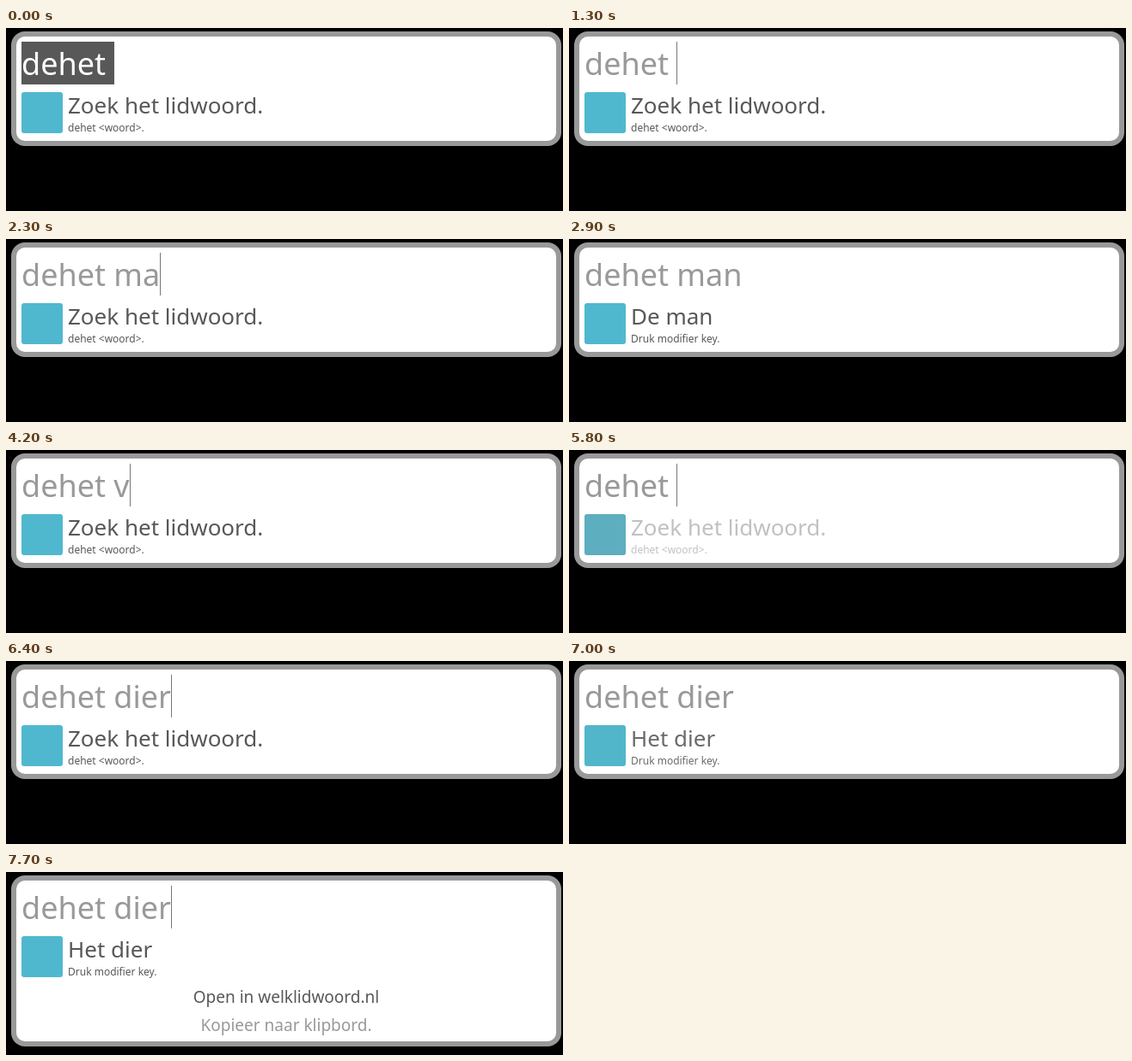
Write an HTML page with a canvas that moves like this. It is 648 by 214 pixels and loops after 8000 ms.

```html
<!DOCTYPE html>
<html lang="nl">
<head>
<meta charset="utf-8">
<title>Lidwoord zoeken</title>
<style>
  html, body { margin: 0; width: 100%; height: 100%; overflow: hidden; background: #000; }
  canvas { display: block; width: 648px; height: 214px; }
</style>
</head>
<body>
<canvas id="stage" width="648" height="214"></canvas>
<script>
const ctx = document.getElementById('stage').getContext('2d');
const LOOP = 8000, TICK = 100;
const GREY = '#999', DARK = '#585858', TEAL = '#50b8ce';

const HINT = ['Zoek het lidwoord.', 'dehet <woord>.'];
const answer = word => [word, 'Druk modifier key.'];

// [start, value] lists; the latest started entry applies
const typed = [
  [0, ''], [2200, 'm'], [2300, 'ma'], [2400, 'man'], [3300, ''],
  [4200, 'v'], [4600, 'vro'], [4800, 'vrou'], [4900, 'vrouw'], [5700, ''],
  [6100, 'd'], [6200, 'di'], [6300, 'die'], [6400, 'dier']
];
const rows = [
  [-1000, HINT], [2600, answer('De man')], [3400, HINT],
  [5200, answer('De vrouw')], [5800, HINT], [6800, answer('Het dier')]
];
const caret = [
  [0, 1], [100, .45], [200, 0], [900, .5], [1000, 1], [1600, .45], [1700, 0],
  [2200, 1], [2800, .2], [2900, 0], [3300, 1], [3600, .2], [3700, 0],
  [4200, 1], [5300, .2], [5400, 0], [5700, 1], [6800, .2], [6900, 0],
  [7500, .5], [7600, 1]
];

const at = (list, t) => list.filter(e => e[0] <= t).pop();
const clamp = v => Math.max(0, Math.min(1, v));
const easeOut = u => 1 - Math.pow(1 - clamp(u), 1.6);

function text(str, x, y, size, color, alpha = 1, align = 'left') {
  ctx.globalAlpha = alpha;
  ctx.font = size + 'px "Noto Sans", "Open Sans", sans-serif';
  ctx.textAlign = align;
  ctx.fillStyle = color;
  ctx.fillText(str, x, y);
  ctx.globalAlpha = 1;
}

function box(x, y, w, h, r, color) {
  ctx.fillStyle = color;
  ctx.beginPath();
  ctx.roundRect(x, y, w, h, r);
  ctx.fill();
}

function drawInput(t) {
  const str = 'dehet ' + at(typed, t)[1];
  const selected = t < 1300;
  if (selected) box(18, 16, 107, 50, 0, DARK);
  text(str, 18, 55, 36, selected ? '#fff' : GREY);
  const x = 18 + Math.round(ctx.measureText(str).width);
  ctx.globalAlpha = at(caret, t)[1];
  box(x, 16, 1, 50, 0, selected ? DARK : '#777');
  ctx.globalAlpha = 1;
}

function drawRow(t) {
  const [start, [title, sub]] = at(rows, t);
  const alpha = easeOut((t - start + TICK) / 400);
  box(18, 75, 48, 48, 3, TEAL);
  ctx.globalAlpha = (1 - alpha) * .35;
  box(18, 75, 48, 48, 3, '#888');
  text(title, 72, 100, 26, DARK, alpha);
  text(sub, 72, 121, 12, DARK, alpha);
}

function draw(t) {
  const open = easeOut((t - 7400) / 300);
  const h = 134 + Math.round(66 * open);
  ctx.fillStyle = '#000';
  ctx.fillRect(0, 0, 648, 214);
  box(6, 4, 640, h, 16, GREY);
  box(12, 10, 628, h - 12, 10, '#fff');
  drawInput(t);
  drawRow(t);
  if (open > 0) {
    ctx.save();
    ctx.beginPath();
    ctx.rect(12, 10, 628, h - 12);
    ctx.clip();
    text('Open in welklidwoord.nl', 326, 153, 19, DARK, open, 'center');
    text('Kopieer naar klipbord.', 326, 186, 19, GREY, open, 'center');
    ctx.restore();
  }
}

const began = performance.now();
function frame() {
  const t = (performance.now() - began) % LOOP;
  draw(Math.floor(t / TICK) * TICK);
  requestAnimationFrame(frame);
}
frame();
</script>
</body>
</html>
```
